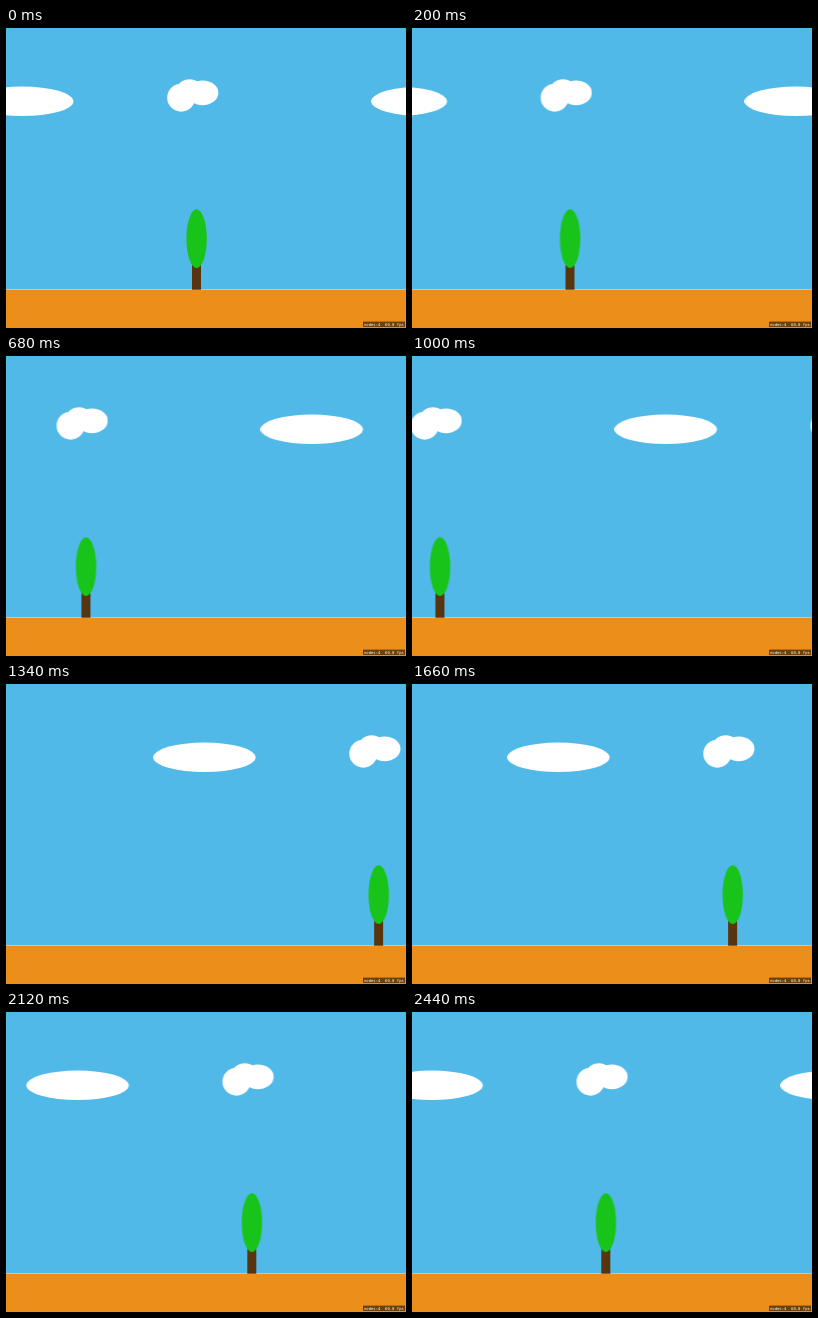
An HTML page that plays this animation: 400x300 px, repeating every 2.46 s.

```html
<!DOCTYPE html>
<html lang="en">
<head>
<meta charset="utf-8">
<title>Scrolling landscape</title>
<style>
  html, body { margin: 0; width: 100%; height: 100%; overflow: hidden; background: #51b9e8; }
  svg { display: block; width: 400px; height: 300px; }
  text { font: 3.9px "DejaVu Sans Mono", monospace; fill: #fff; white-space: pre; }
</style>
</head>
<body>
<svg viewBox="0 0 400 300">
  <defs>
    <g id="scene">
      <g fill="#fff">
        <ellipse cx="16.3" cy="73.3" rx="51.2" ry="14.8"/>
        <circle cx="175.2" cy="69.7" r="14"/>
        <ellipse cx="183.5" cy="62" rx="12.5" ry="10.8"/>
        <ellipse cx="196.6" cy="64.8" rx="15.8" ry="12.4"/>
      </g>
      <rect x="186" y="225" width="9" height="36.7" fill="#58340f"/>
      <ellipse cx="190.6" cy="210.7" rx="10.2" ry="29.4" fill="#18c41a"/>
    </g>
  </defs>
  <rect width="400" height="300" fill="#51b9e8"/>
  <rect y="261" width="400" height="1" fill="#e3c28c"/>
  <rect y="262" width="400" height="38" fill="#ec8e1a"/>
  <g id="strip">
    <use href="#scene"/>
    <use href="#scene" x="400"/>
    <use href="#scene" x="800"/>
  </g>
  <rect x="357" y="293.6" width="42" height="5.4" fill="#000" fill-opacity=".55"/>
  <text x="358" y="297.7">nodes:4  60.0 fps</text>
</svg>
<script>
  const LOOP = 2460, STEP = 20, WIDTH = 400;
  document.getElementById("strip").animate(
    { transform: ["translateX(0)", `translateX(${-WIDTH}px)`] },
    { duration: LOOP, iterations: Infinity, easing: `steps(${LOOP / STEP}, end)` }
  );
</script>
</body>
</html>
```
